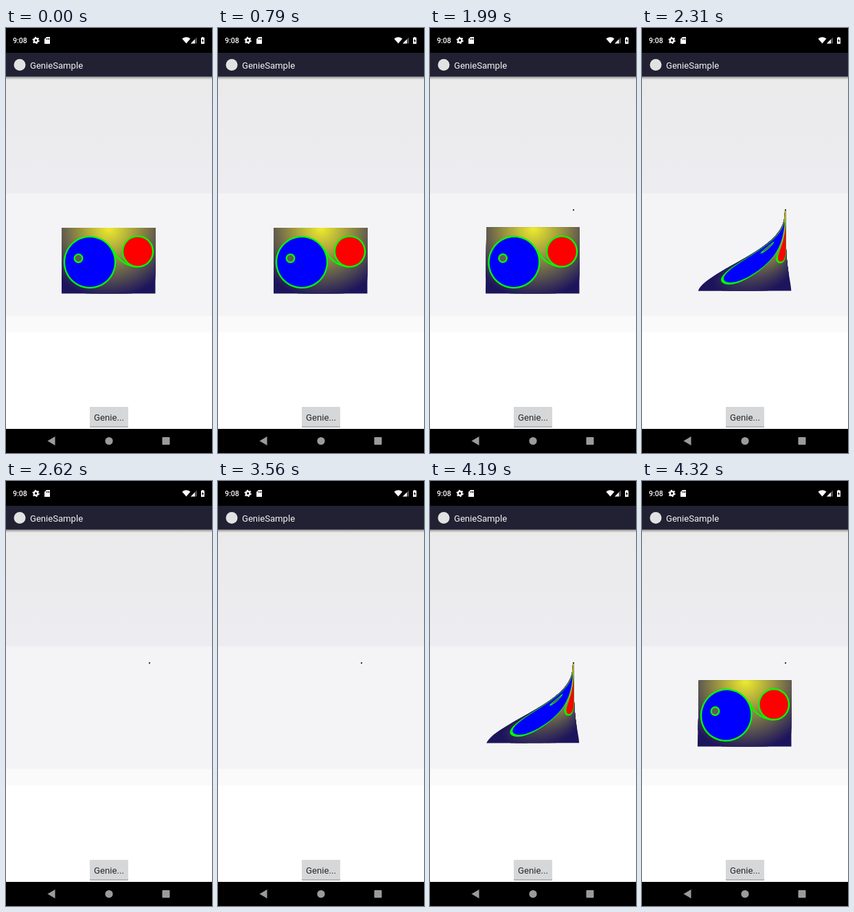
These frames come from a looping animation (300x617 px, 5560 ms). An HTML page:

```html
<!DOCTYPE html>
<html lang="en">
<head>
<meta charset="utf-8">
<title>Genie effect</title>
<style>
  html, body { margin: 0; width: 100%; height: 100%; overflow: hidden; background: #fff; }
  svg { display: block; width: 300px; height: 617px; font-family: Roboto, sans-serif; }
</style>
</head>
<body>
<svg viewBox="0 0 300 617">
  <defs>
    <linearGradient id="upper" x2="0" y2="1">
      <stop offset="0" stop-color="#eaeaeb"/><stop offset="1" stop-color="#ededf1"/>
    </linearGradient>
    <linearGradient id="shade" x2="0" y2="1">
      <stop offset="0" stop-color="#000" stop-opacity=".4"/><stop offset="1" stop-color="#000" stop-opacity="0"/>
    </linearGradient>
  </defs>

  <!-- page -->
  <rect width="300" height="617" fill="#fff"/>
  <rect y="70" width="300" height="170" fill="url(#upper)"/>
  <rect y="240" width="300" height="178" fill="#f4f4f6"/>
  <rect y="418" width="300" height="24" fill="#fafafb"/>

  <!-- status bar -->
  <rect width="300" height="36" fill="#000"/>
  <g fill="#fff">
    <text x="10" y="22" font-size="10.5" font-weight="500">9:08</text>
    <circle cx="43.5" cy="18" r="2.8" fill="none" stroke="#fff" stroke-width="2.2"/>
    <circle cx="43.5" cy="18" r="4.5" fill="none" stroke="#fff" stroke-width="1.4" stroke-dasharray="2.2 2.51"/>
    <path d="M59 13h5v10h-8v-7zM58.500 15v2h1v-2zM60.500 15v2h1v-2zM62.200 15v2h1v-2z" fill-rule="evenodd"/>
    <path d="M256.500 15.500Q262.500 11 268.500 15.500L262.500 22.500z"/>
    <path d="M269 22.500L278 13.500V22.500z" fill="#555"/>
    <path d="M269 22.500L275 16.500V22.500z"/>
    <path d="M284 14h1.500v-1h2v1h1.500v9h-5zM287 15.500l-2 3.500h1.200v2.500l2-3.500h-1.200z" fill-rule="evenodd"/>
  </g>

  <!-- action bar -->
  <rect y="70" width="300" height="5" fill="url(#shade)"/>
  <rect y="36" width="300" height="34.500" fill="#212133"/>
  <circle cx="20" cy="53.500" r="8.500" fill="#e2e2e2"/>
  <text x="35" y="58.500" font-size="13.1" fill="#f4f4f4">GenieSample</text>

  <!-- button -->
  <rect x="122" y="551" width="56" height="29" rx="1" fill="#a9a9ab"/>
  <rect x="122" y="550" width="56" height="28.500" rx="1" fill="#d6d7d9"/>
  <text x="128" y="569.500" font-size="13.2" fill="#2a2a2b">Genie...</text>

  <!-- navigation bar -->
  <rect y="582" width="300" height="35" fill="#000"/>
  <g fill="#9b9b9b">
    <path d="M60.500 599.500L71.500 593V606z"/>
    <circle cx="150" cy="599.500" r="5.600"/>
    <rect x="227.500" y="594" width="11" height="11" rx="1"/>
  </g>

  <g id="picture"></g>
  <rect id="dot" x="208" y="263.400" width="2" height="1.700" fill="#000"/>
</svg>

<script>
const LOOP = 5560, STEP = 44.7;
const HIDE = { start: 1900, end: 2615, anchor: 1990 };
const SHOW = { start: 3560, length: 768, last: 4320 };
const BOX = { x: 81, y: 290, w: 136.5, h: 95.5 };
const TIP = { left: 208, right: 209.5, y: 264 };

const picture = document.getElementById('picture');
const dot = document.getElementById('dot');
const clamp = x => Math.min(1, Math.max(0, x));
const mix = (a, b, k) => a + (b - a) * k;
const smooth = x => x * x * (3 - 2 * x);

const shapes = [];
function addShape(points, fill) {
  const path = document.createElementNS('http://www.w3.org/2000/svg', 'path');
  path.setAttribute('fill', fill);
  picture.append(path);
  shapes.push({ path, points });
}

const sample = (n, fn) => Array.from({ length: n + 1 }, (_, i) => fn(i / n));
const arc = (cx, cy, r, turn, n) => sample(n, k =>
  [cx + r * Math.cos(k * turn), cy + r * Math.sin(k * turn)]);

function addDisc(cx, cy, r, fill) {
  addShape(arc(cx, cy, r + 1.2, 2 * Math.PI, 64), '#00ff00');
  addShape(arc(cx, cy, r - 1.1, 2 * Math.PI, 64), fill);
}

function buildPicture() {
  const right = BOX.x + BOX.w, bottom = BOX.y + BOX.h;
  addShape([
    ...sample(40, k => [BOX.x, mix(BOX.y, bottom, k)]),
    ...sample(40, k => [right, mix(bottom, BOX.y, k)])
  ], 'rgb(29,21,92)');

  // yellow glow from the middle of the top edge
  const rings = 40, radius = 102;
  for (let i = rings; i > 0; i--) {
    const k = (i - 0.5) / rings;
    const rgb = [mix(240, 29, k), mix(237, 21, k), mix(46, 92, k)].map(Math.round);
    addShape(arc(150, BOX.y, radius * i / rings, Math.PI, 48), `rgb(${rgb})`);
  }

  const curve = d => sample(16, k => [
    mix(mix(156, 165, k), mix(165, 190, k), k) + d,
    mix(mix(322, 343, k), mix(343, 347, k), k) - d
  ]);
  addShape([...curve(0.8), ...curve(-0.8).reverse()], '#00ff00');
  addDisc(122, 340, 37, '#0000ff');
  addDisc(105.5, 334.3, 5.7, '#625d50');
  addDisc(192, 324.5, 22, '#ff0000');
}

// bend: sides pulled into curves; slide: picture drawn along them
function warp([x, y], bend, slide) {
  const u = clamp((x - BOX.x) / BOX.w), v = clamp((y - BOX.y) / BOX.h);
  const p = Math.max(0, v - slide);
  const q = p + p * (1 - p) * (0.9 - p);
  const tall = BOX.y + BOX.h - TIP.y;
  const lx = mix(TIP.left, BOX.x, smooth(p ** 1.36));
  const rx = mix(TIP.right, BOX.x + BOX.w, smooth(q ** 2.44));
  return [
    mix(BOX.x + u * BOX.w, mix(lx, rx, u), bend),
    mix(BOX.y + v * BOX.h, TIP.y + tall * mix(p, q, u), bend)
  ];
}

const snap = (t, anchor) => anchor + Math.floor((t - anchor) / STEP) * STEP;

function progress(t) {
  if (t < SHOW.start) {
    const k = clamp((snap(t, HIDE.anchor) - HIDE.start) / (HIDE.end - HIDE.start));
    return k * k;
  }
  const k = clamp((snap(Math.min(t, SHOW.last), SHOW.start) - SHOW.start) / SHOW.length);
  return 1 - k * k;
}

let drawn = -1;
function render(t) {
  dot.setAttribute('visibility', t >= HIDE.start ? 'visible' : 'hidden');
  const q = progress(t);
  if (q === drawn) return;
  drawn = q;
  picture.setAttribute('visibility', q < 1 ? 'visible' : 'hidden');
  const bend = smooth(clamp(q / 0.3));
  const slide = clamp((q - 0.2) / 0.8) ** 1.8;
  for (const { path, points } of shapes) {
    const d = points.map(pt => warp(pt, bend, slide).map(n => n.toFixed(2)).join(' '));
    path.setAttribute('d', 'M' + d.join('L') + 'Z');
  }
}

buildPicture();
const begin = performance.now();
function tick() {
  render((performance.now() - begin) % LOOP);
  requestAnimationFrame(tick);
}
tick();
</script>
</body>
</html>
```
